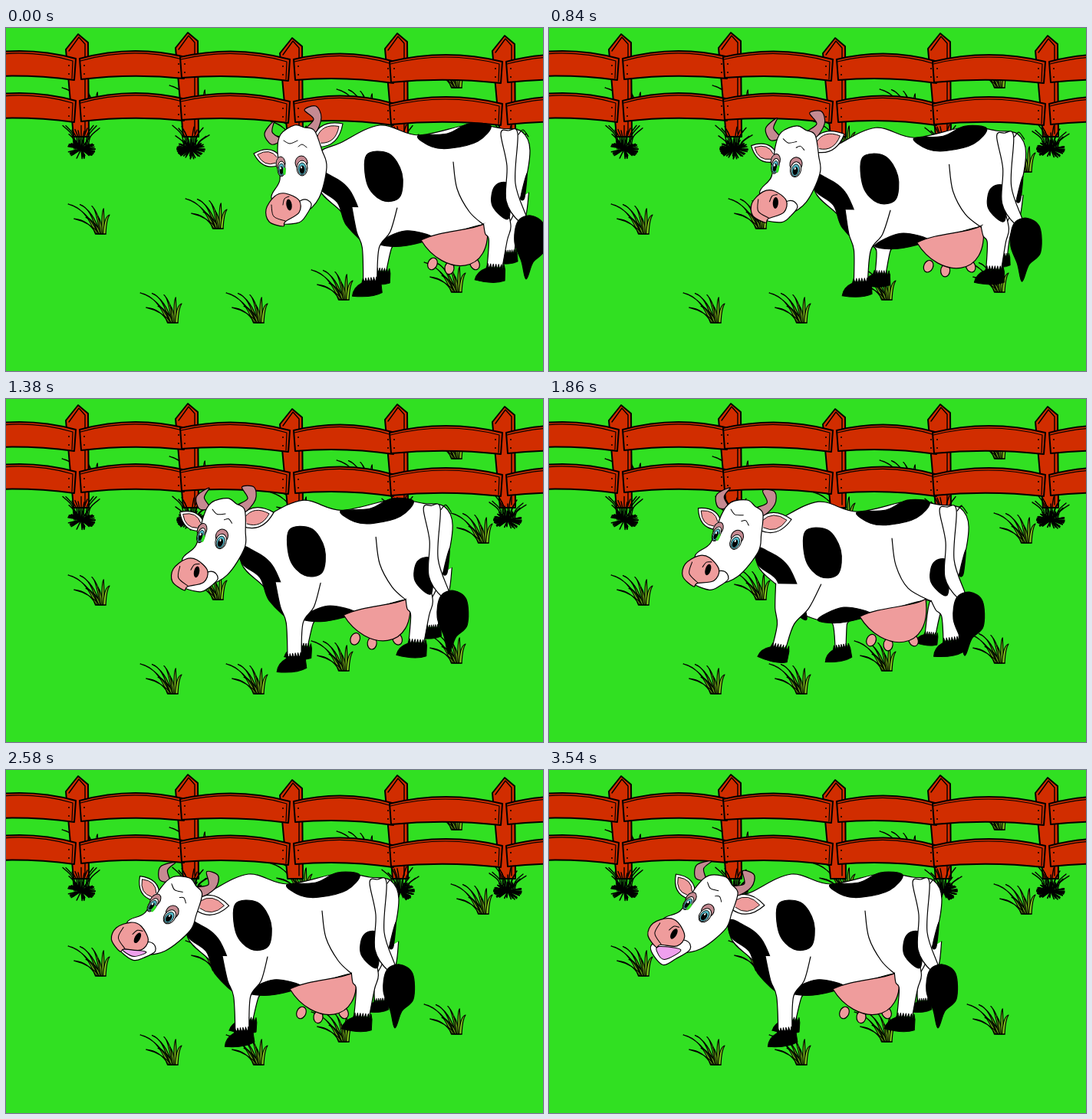
Write an HTML page with a canvas that moves like this. It is 700 by 448 pixels and loops after 3.6 s.

```html
<!DOCTYPE html>
<html lang="en">
<head>
<meta charset="utf-8">
<title>Walking cow</title>
<style>
html, body { margin: 0; width: 100%; height: 100%; overflow: hidden; background: #31e022; }
canvas { display: block; }
</style>
</head>
<body>
<canvas id="stage" width="700" height="448"></canvas>
<script>
const LOOP = 3600, STEP = 60, STOP = 2340, STRIDE = 1400;
const GREEN = '#31e022', RED = '#d12d00', PINK = '#ef9c9c', HORN = '#c58a92', LEAF = '#80c51b';
const ctx = document.getElementById('stage').getContext('2d');

const mix = (a, b, k) => a + (b - a) * k;
const progress = (t, from, to) => Math.max(0, Math.min(1, (t - from) / (to - from)));

function seeded(seed) {
  return () => (seed = (seed * 16807) % 2147483647) / 2147483647;
}

function paint(fill, width = 1.2) {
  if (fill) { ctx.fillStyle = fill; ctx.fill(); }
  if (width) { ctx.lineWidth = width; ctx.stroke(); }
}

// Smooth curve through a flat list of coordinates.
function trace(p, closed, join) {
  const n = p.length / 2;
  const at = i => {
    const j = closed ? (i + n) % n : Math.max(0, Math.min(n - 1, i));
    return [p[2 * j], p[2 * j + 1]];
  };
  if (join) ctx.lineTo(p[0], p[1]); else ctx.moveTo(p[0], p[1]);
  for (let i = 0; i < (closed ? n : n - 1); i++) {
    const [a, b, c, d] = [at(i - 1), at(i), at(i + 1), at(i + 2)];
    ctx.bezierCurveTo(b[0] + (c[0] - a[0]) / 6, b[1] + (c[1] - a[1]) / 6,
      c[0] - (d[0] - b[0]) / 6, c[1] - (d[1] - b[1]) / 6, c[0], c[1]);
  }
}

function blob(p, fill, width) {
  ctx.beginPath();
  trace(p, true);
  paint(fill, width);
}

function curve(p, width) {
  ctx.beginPath();
  trace(p);
  paint(null, width);
}

function oval(x, y, rx, ry, fill, width = 0, turn = 0) {
  ctx.beginPath();
  ctx.ellipse(x, y, rx, ry, turn, 0, 7);
  paint(fill, width);
}

function placed(x, y, turn, size, draw) {
  ctx.save();
  ctx.translate(x, y);
  ctx.rotate(turn);
  ctx.scale(size, size);
  draw();
  ctx.restore();
}

// ---- Meadow ----

// A fan of blades, alternately long and short, the longest arching to the left.
function grass([x, y]) {
  for (let i = 0; i < 8; i++) {
    const u = i / 7, root = x + mix(-6, 4, u);
    const tipX = mix(-43, 11, u), tipY = i % 2 ? -19 - 6 * u : -39 + 8 * u * u;
    const bendX = x + tipX * 0.45, bendY = y + tipY * 0.85;
    ctx.beginPath();
    ctx.moveTo(root - 1.5, y);
    ctx.quadraticCurveTo(bendX - 1, bendY - 1.5, x + tipX, y + tipY);
    ctx.quadraticCurveTo(bendX + 2, bendY + 2, root + 2, y);
    paint(LEAF, 1.2);
  }
  curve([x - 7, y, x + 6, y], 1.5);
}

// A ragged dark clump with thin blades curving out of it.
function darkGrass([x, y]) {
  const random = seeded(x);
  for (let i = 0; i < 60; i++) {
    const a = random() * Math.PI * 2;
    curve([x, y - 10, x + Math.cos(a) * 18, y - 10 + Math.sin(a) * (7 + 6 * random())], 1.6);
  }
  for (let i = -6; i <= 6; i++) {
    const height = 24 + 18 * random();
    curve([x + i * 1.5, y - 10, x + i * 2, y - height * 0.7, x + i * 4, y - height], 1.4);
  }
}

function post([x, y]) {
  ctx.beginPath();
  ctx.moveTo(x - 6, 142);
  ctx.lineTo(x - 16, y + 20);
  ctx.lineTo(x, y);
  ctx.lineTo(x + 13, y + 11);
  ctx.lineTo(x + 14, 142);
  ctx.closePath();
  paint(RED, 2);
  ctx.beginPath();
  ctx.moveTo(x - 12, y + 22);
  ctx.lineTo(x + 1, y + 4);
  ctx.lineTo(x + 9, y + 13);
  ctx.lineTo(x + 9, 138);
  paint(null, 1.4);
}

// An arched plank whose lower edge is flatter than its upper edge.
function board(x1, y1, x2, y2) {
  const mid = (x1 + x2) / 2, y = (y1 + y2) / 2;
  ctx.beginPath();
  ctx.moveTo(x1, y1);
  ctx.quadraticCurveTo(mid, y - 18, x2, y2);
  ctx.lineTo(x2 - 2, y2 + 28);
  ctx.quadraticCurveTo(mid, y + 20, x1 + 2, y1 + 27);
  ctx.closePath();
  paint(RED, 2);
  ctx.beginPath();
  ctx.moveTo(x1 + 1, y1 + 3);
  ctx.quadraticCurveTo(mid, y - 15, x2 - 4, y2 + 3);
  ctx.lineTo(x2 - 5, y2 + 26);
  paint(null, 1.2);
  for (const dy of [9, 20]) {
    oval(x1 + 6, y1 + dy, 1, 1, '#000');
    oval(x2 - 9, y2 + dy, 1, 1, '#000');
  }
}

// Post x, post top, rail height; the outer two stand off stage.
const POSTS = [[-50, 8, 38], [94, 8, 40], [237, 6, 38], [373, 13, 41], [510, 7, 44], [650, 10, 44], [795, 8, 43]];
const BACK_GRASS = [[588, 78], [474, 119], [256, 114], [116, 117], [388, 161]];
const FRONT_GRASS = [[124, 269], [277, 262], [218, 385], [330, 385], [441, 355], [588, 345], [623, 188]];

function meadow() {
  ctx.fillStyle = GREEN;
  ctx.fillRect(0, 0, 700, 448);
  BACK_GRASS.forEach(grass);
  POSTS.forEach(post);
  for (let i = 0; i < POSTS.length - 1; i++) {
    const [x1, , y1] = POSTS[i], [x2, , y2] = POSTS[i + 1];
    const overlap = i && i % 2 === 0 ? -10 : 2;
    for (const drop of [0, 55]) board(x1 + overlap, y1 + drop, x2 - 3, y2 + drop);
  }
  for (const i of [1, 2, 4, 5]) darkGrass([POSTS[i][0] + 4, 168]);
  FRONT_GRASS.forEach(grass);
}

// ---- Legs: diagonal pairs swing together ----

const NEAR_FRONT = { x: 463, y: 326, swing: 27, lift: 9, knee: 287, hip: [445, 234, 504, 235], wide: 11, size: 1 };
const FAR_FRONT = { x: 497, y: 317, swing: -19, lift: 0, knee: 288, hip: [478, 268, 508, 276], wide: 9, size: .9 };
const NEAR_REAR = { x: 644, y: 311, swing: -16, lift: 3, knee: 277, hip: [626, 256, 656, 232], wide: 12, size: 1 };
const FAR_REAR = { x: 649, y: 295, swing: 16, lift: -5, knee: 266, hip: [655, 228, 678, 215], wide: 9, size: .75 };

const stride = t => Math.cos((Math.min(t, STOP) - 1150) / STRIDE * Math.PI * 2);
const hipShift = (part, s) => part.swing * s * 0.5;

function hoof() {
  ctx.beginPath();
  ctx.moveTo(-25, 18);
  ctx.quadraticCurveTo(-23, 7, -11, 2);
  for (let x = -9; x <= 12; x += 3.5) {
    ctx.lineTo(x, -4);
    ctx.lineTo(x + 1.7, 3);
  }
  ctx.lineTo(14, 17);
  ctx.quadraticCurveTo(0, 23, -25, 18);
  paint('#000', 1);
}

function leg(part, s) {
  const { swing, wide, knee } = part, shift = hipShift(part, s);
  const [lx, ly, rx, ry] = part.hip;
  const ankleX = part.x + swing * s, ankleY = part.y + part.lift * s;
  const kneeX = part.x + 3 + swing * s * 0.8;
  const left = [lx + shift, ly, mix(lx + shift, kneeX - wide, .6) - 2, mix(ly, knee, .6),
    kneeX - wide, knee, ankleX - wide + 2, ankleY];
  const right = [ankleX + wide - 2, ankleY, kneeX + wide, knee,
    mix(rx + shift, kneeX + wide, .6) + 5, mix(ry, knee, .6), rx + shift, ry];
  ctx.beginPath();
  trace(left);
  trace(right, false, true);
  paint('#fff', 0);
  curve(left);
  curve(right);
  placed(ankleX, ankleY, -swing * s * 0.008, part.size, hoof);
}

// ---- Body ----

function udder() {
  for (const u of [0, 0.4, 1]) {
    oval(mix(556, 611, u), 308 + 6 * Math.sin(u * Math.PI), 6, 8, PINK, 1.2, mix(.4, -.4, u));
  }
  ctx.beginPath();
  ctx.moveTo(541, 277);
  ctx.bezierCurveTo(570, 263, 605, 266, 627, 254);
  ctx.bezierCurveTo(636, 325, 570, 325, 541, 277);
  paint(PINK);
}

function trunk() {
  blob([408, 165, 436, 150, 487, 127, 538, 140, 605, 126, 645, 131, 672, 135, 683, 160, 673, 215, 650, 262,
    625, 256, 556, 275, 505, 285, 456, 268, 437, 240, 408, 210], '#fff');
  blob([405, 188, 420, 191, 450, 215, 472, 280, 444, 258, 432, 228, 409, 210], '#000');
  blob([486, 281, 520, 265, 556, 274, 515, 285], '#000');
  blob([537, 141, 575, 138, 603, 125, 632, 128, 615, 148, 580, 157, 555, 155], '#000');
  blob([470, 166, 499, 164, 516, 190, 513, 221, 490, 225, 471, 204], '#000');
  blob([679, 190, 671, 221, 676, 221], '#000');
  udder();
}

function tail() {
  blob([655, 205, 637, 207, 634, 232, 655, 249], '#000');
  blob([645, 138, 655, 134, 667, 138, 664, 203, 680, 252, 670, 254, 652, 226, 653, 180], '#fff');
  curve([668, 139, 674, 133, 681, 142]);
  blob([667, 253, 684, 245, 701, 257, 702, 290, 687, 306, 678, 328, 672, 305, 663, 280], '#000');
}

// ---- Head ----

const EYE = { x: 386, y: 182 };

function ear(x, y, tipX, tipY, half) {
  const length = Math.hypot(tipX - x, tipY - y), turn = Math.atan2(tipY - y, tipX - x);
  const leaf = fill => {
    ctx.beginPath();
    ctx.moveTo(0, -half * .5);
    ctx.quadraticCurveTo(length * .5, -half * 1.7, length, 0);
    ctx.quadraticCurveTo(length * .5, half * 1.7, 0, half * .5);
    paint(fill);
  };
  placed(x, y, turn, 1, () => leaf('#fff'));
  placed(mix(x, tipX, .14), mix(y, tipY, .14), turn, .72, () => leaf(PINK));
}

function eye(x, y, r) {
  oval(x - 1, y - 7, r + 1, 9, HORN, 1);
  oval(x, y, r, 10, '#fff', 1);
  oval(x, y + 1, r * .75, 8, '#54b8c8', .8);
  oval(x, y + 2, r * .48, 5.5, '#000');
  oval(x - 1, y - 1, 1, 1.6, '#fff');
}

function mouth(open) {
  blob([358, 250, 362 - 4 * open, 256 + 6 * open, 382, 254 + 14 * open, 391, 245 + 6 * open,
    398, 230, 385, 225], '#fff');
  if (open) blob([364, 252, 366, 254 + 5 * open, 380, 250 + 11 * open, 389, 238], '#efa0ee', 1);
  placed(0, -4 * open, 0, 1, () => {
    blob([350, 220, 364, 216, 382, 225, 382, 241, 364, 253, 361, 259, 343, 253, 339, 237], PINK);
    curve([346, 231, 349, 246, 364, 252], 1);
    oval(369, 231, 3.6, 7.5, '#000', 0, -.15);
    curve([361, 231, 363, 223, 369, 220], 1);
  });
}

function face(open) {
  ear(403, 150, 439, 125, 13);
  ear(357, 174, 323, 164, 11);
  blob([349, 122, 337, 138, 346, 152, 358, 146, 347, 136], HORN);
  blob([389, 107, 404, 102, 411, 117, 403, 137, 390, 133, 401, 119], HORN);
  blob([354, 160, 358, 139, 376, 127, 389, 130, 402, 134, 412, 160, 418, 182, 408, 222, 386, 244, 366, 246,
    346, 222, 357, 198], '#fff');
  curve([362, 147, 370, 151, 380, 147], 1);
  curve([381, 155, 386, 152, 392, 156], 1);
  eye(359, 184, 5);
  oval(363, 187, 1.8, 5, GREEN);
  eye(386, 183, 7);
  mouth(open);
}

// The head tilts back while walking, then lifts and opens its mouth.
function head(t) {
  const walk = progress(t, 0, STOP), rise = progress(t, STOP, STOP + 240), moo = progress(t, 2700, LOOP - STEP);
  const x = EYE.x - 179 * walk + 7 * rise - 10 * moo;
  const y = EYE.y + 5 * walk + 4 * rise - 2 * moo;
  const degrees = 32 * walk + 5 * rise + moo;
  placed(x, y, degrees * Math.PI / 180, 1, () => {
    ctx.translate(-EYE.x, -EYE.y);
    face(.2 * rise + .8 * moo);
  });
}

function cow(t) {
  const walk = progress(t, 0, STOP), s = stride(t);
  placed(-171 * walk, 9 * walk, 0, 1, () => {
    leg(FAR_REAR, s);
    leg(FAR_FRONT, s);
    trunk();
    leg(NEAR_REAR, s);
    curve([583, 175, 588, 210, 604, 240, NEAR_REAR.hip[0] + hipShift(NEAR_REAR, s), 257]);
    leg(NEAR_FRONT, s);
    tail();
  });
  head(t);
}

ctx.lineJoin = ctx.lineCap = 'round';

function frame() {
  meadow();
  cow(Math.floor(performance.now() % LOOP / STEP) * STEP);
  requestAnimationFrame(frame);
}
frame();
</script>
</body>
</html>
```
